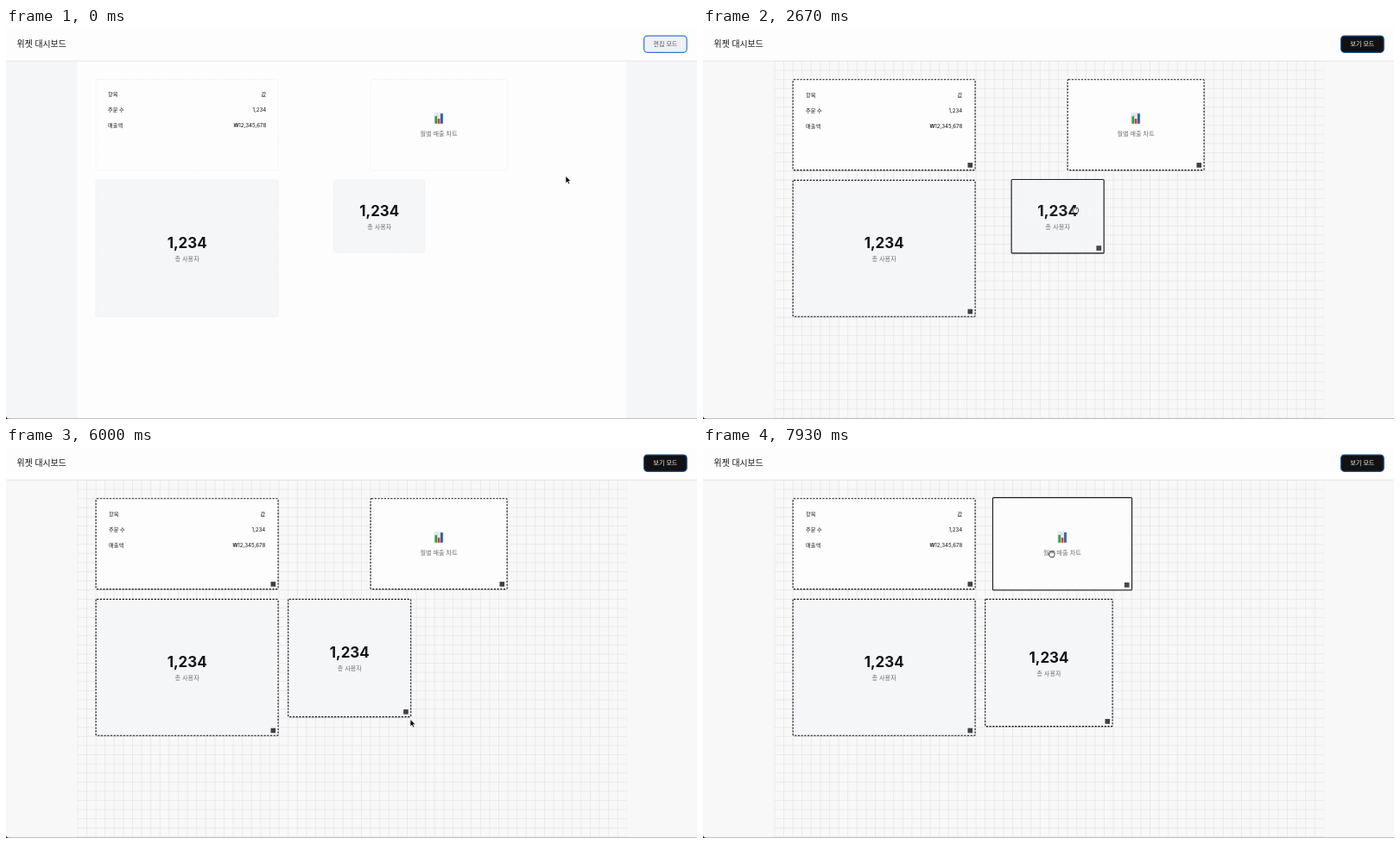
These frames come from a looping animation (800x453 px, 8000 ms). An HTML page:

```html
<!DOCTYPE html>
<html lang="ko">
<head>
<meta charset="utf-8">
<title>위젯 대시보드</title>
<style>
html, body { margin: 0; width: 100%; height: 100%; overflow: hidden; background: #f8f8f8; }
svg { display: block; width: 100%; height: 100%; }
text { font-family: Inter, 'Noto Sans CJK KR', 'Noto Sans CJK', sans-serif; fill: #141416; }
.title { font-size: 9.9px; font-weight: 500; }
.button { font-size: 7px; font-weight: 400; text-anchor: middle; }
.number { font-size: 16.9px; font-weight: 700; text-anchor: middle; }
.label { font-size: 7.1px; fill: #707076; text-anchor: middle; }
.cell { font-size: 6.2px; }
.right { text-anchor: end; }
.outline { fill: #fff; stroke: #111; stroke-width: .8; stroke-linejoin: round; }
</style>
</head>
<body>
<svg viewBox="0 0 800 453" preserveAspectRatio="none">
  <defs>
    <pattern id="grid" x="82.4" y="38" width="10.6" height="10.6" patternUnits="userSpaceOnUse">
      <path d="M.35 0V10.6M0 .35H10.6" fill="none" stroke="#e3e3ea" stroke-width=".7"/>
    </pattern>
  </defs>
  <rect id="page" width="800" height="453"/>
  <rect id="panel" x="82.4" y="38" width="636" height="415" fill="#fdfdfd"/>
  <rect id="gridArea" x="82.4" y="38" width="636" height="415" fill="url(#grid)"/>
  <rect width="800" height="38" fill="#fdfdfd"/>
  <path d="M0 38.2H800" stroke="#e6e6ea" stroke-width=".9"/>
  <text class="title" x="12.6" y="21.8">위젯 대시보드</text>
  <rect id="button" x="738.6" y="9.1" width="49.6" height="19.2" rx="4" stroke-width="1.2"/>
  <text id="buttonText" class="button" x="763.4" y="21.1"></text>
  <g id="cards"></g>
  <path d="M0 452.6H800" stroke="#a8a8a8" stroke-width=".8"/>
  <path d="M0 449Q0 453 4 453H0Z" fill="#111"/>
  <g id="cursor">
    <path id="arrow" d="M0 0V8.2L1.9 6.5L3.2 9.3L4.6 8.7L3.4 6H5.9Z"
          fill="#000" stroke="#fff" stroke-width=".6"/>
    <path id="hand" class="outline" d="M-1 0Q0-1 .8 0V3.3L4.5 4Q5.6 4.4 5.4 6L4.6 9H.2L-2.6 5.6Q-2.7 4.4-1 5.2Z"/>
    <g id="grab">
      <path class="outline" d="M-3-1.6Q-2.3-3.4-1-2.6Q.2-3.7 1.2-2.6Q2.6-3.2 3.1-1.5L3 1.4L1.9 3.6H-1.7L-3.5.8Q-3.8-.6-3-1.6Z"/>
      <path d="M-1-2.4V-.6M1.1-2.4V-.6M-2.7-1.2V.4" stroke="#111" stroke-width=".6"/>
    </g>
  </g>
</svg>
<script>
const LOOP = 8000, CELL = 10.6, EDIT = 1400;
const DRAG = [2400, 3950], RESIZE = [4950, 6400], CHART_DRAG = 7250;
const $ = id => document.getElementById(id);
const clamp = v => Math.max(0, Math.min(1, v));
const ease = v => (v = clamp(v), v * v * (3 - 2 * v));
const mix = (a, b, k) => a + (b - a) * k;
const set = (el, attrs) => { for (const name in attrs) el.setAttribute(name, attrs[name]); };
const rgb = (a, b, k) => `rgb(${a.map((v, i) => Math.round(mix(v, b[i], k)))})`;

// time, x, y of the pointer
const track = [
  [0, 648, 171.5], [1200, 754, 19], [1520, 754, 19], [2300, 453, 211],
  [2400, 453, 211], [2670, 431.5, 211], [3350, 400, 210.5], [4130, 400, 210.5],
  [4800, 431, 263], [4950, 431, 263], [5470, 451, 285], [6300, 473, 324],
  [6670, 474, 323], [6730, 485, 273], [7130, 489, 124], [7250, 489, 124],
  [7930, 404, 124], [8000, 400, 124]
];

// Monotone cubic interpolation: flat at rests, smooth through points passed.
function pointerAt(t) {
  let i = 0;
  while (i < track.length - 2 && t >= track[i + 1][0]) i++;
  const slope = (n, axis) => {
    const a = track[n], b = track[n + 1];
    return a && b ? (b[axis] - a[axis]) / (b[0] - a[0]) : 0;
  };
  const tangent = (n, axis) => {
    const a = slope(n - 1, axis), b = slope(n, axis);
    return a * b > 0 ? 2 * a * b / (a + b) : 0;
  };
  const [a, b] = [track[i], track[i + 1]], span = b[0] - a[0], u = clamp((t - a[0]) / span);
  return [1, 2].map(axis => mix(a[axis], b[axis], ease(u))
    + span * u * (1 - u) * (tangent(i, axis) * (1 - u) - tangent(i + 1, axis) * u));
}

const table = [['항목', '값'], ['주문 수', '1,234'], ['매출액', '₩12,345,678']]
  .map(([key, value], i) => {
    const y = 20.2 + i * 17.6, weight = i ? 400 : 500;
    return `<text class="cell" x="14.4" y="${y}" font-weight="${weight}">${key}</text>
      <text class="cell right" x="197.7" y="${y}" font-weight="${weight}">${value}</text>`;
  }).join('');
const counter = '<text class="number" y="-.2">1,234</text><text class="label" y="14.6">총 사용자</text>';
const chart = `<rect x="-5.6" y="-14.4" width="11.2" height="13" rx=".6" fill="#e6ebee"/>
  <path d="M-5.6-10.5H5.6M-5.6-6.5H5.6M-2-14.4V-1.4M2-14.4V-1.4" stroke="#c5cdd2" stroke-width=".4"/>
  <rect x="-4.6" y="-10" width="2.6" height="8.6" fill="#2c9d38"/>
  <rect x="-1.3" y="-7" width="2.6" height="5.6" fill="#d8372c"/>
  <rect x="2" y="-13" width="2.7" height="11.6" fill="#285e9e"/>
  <text class="label" y="12.9">월별 매출 차트</text>`;

function makeCard(col, row, cols, rows, content, tinted, centred = true) {
  const root = document.createElementNS('http://www.w3.org/2000/svg', 'g');
  root.innerHTML = `<rect class="shadow" fill="#5a5e68" rx="2"/><rect class="box" rx="2"/>
    <g class="content">${content}</g><rect class="handle" width="5.6" height="5.6" fill="#404044"/>`;
  $('cards').append(root);
  const part = name => root.querySelector('.' + name);
  return {
    root, tinted, centred, x: 82.4 + col * CELL, y: 38 + row * CELL, w: cols * CELL, h: rows * CELL,
    shadow: part('shadow'), box: part('box'), content: part('content'), handle: part('handle')
  };
}
const cards = [
  makeCard(2, 2, 20, 10, table, false, false),
  makeCard(2, 13, 20, 15, counter, true),
  makeCard(28, 13, 10, 8, counter, true),
  makeCard(32, 2, 15, 10, chart, false)
];

function drawCard(card, { x = card.x, y = card.y, w = card.w, h = card.h, lift = 0 }, t, pointer) {
  const edit = t >= EDIT, k = edit ? ease((t - EDIT - 20) / 160) : 0;
  const hover = pointer[0] > x && pointer[0] < x + w && pointer[1] > y && pointer[1] < y + h;
  const solid = hover || lift > 0, inset = mix(.3, .53, k);
  const cx = x + w / 2, cy = y + h / 2, scale = 1 + .02 * lift;
  set(card.root, {
    transform: `translate(${cx} ${cy}) scale(${scale}) translate(${-w / 2} ${-h / 2})`,
    opacity: 1 - .05 * lift
  });
  set(card.shadow, { y: .7, width: w, height: h, opacity: edit ? .22 : 0 });
  set(card.box, {
    x: inset, y: inset, width: w - 2 * inset, height: h - 2 * inset, rx: mix(2.5, 1, k),
    fill: card.tinted ? '#f4f6f8' : '#fdfdfd',
    stroke: rgb([232, 232, 236], [17, 17, 19], k), 'stroke-width': mix(.6, 1.1, k),
    'stroke-dasharray': edit && !solid ? '2.1 1.6' : edit ? 'none' : '1.6 1'
  });
  set(card.content, { transform: card.centred ? `translate(${w / 2} ${h / 2})` : `translate(${k} ${k})` });
  if (!card.centred)
    card.content.querySelectorAll('.right').forEach(el => set(el, { x: 197.7 - 2 * k }));
  set(card.handle, { x: w - 8.1 - k, y: h - 8.1 - k, visibility: edit ? 'visible' : 'hidden' });
  return hover;
}

function counterState(t, pointer) {
  const card = cards[2], between = ([from, to]) => t >= from && t < to;
  const lift = ease((t - DRAG[0]) / 150) * (1 - ease((t - DRAG[1]) / 150));
  const x = between(DRAG) ? card.x + pointer[0] - 453 : t < DRAG[0] ? card.x : card.x - 5 * CELL;
  if (between(RESIZE))
    return { x, w: card.w + pointer[0] - 431, h: card.h + pointer[1] - 263 };
  return t < RESIZE[0] ? { x, lift } : { x, w: 14 * CELL, h: 14 * CELL };
}

function chartState(t, pointer) {
  return t < CHART_DRAG ? {} : {
    x: cards[3].x + pointer[0] - 489,
    lift: ease((t - CHART_DRAG) / 150)
  };
}

function render(t) {
  const edit = t >= EDIT, pointer = pointerAt(t);
  const dark = edit ? ease((t - EDIT) / 200) : 0;
  set($('page'), { fill: edit ? '#f8f8f8' : '#f5f6f7' });
  set($('panel'), { visibility: edit ? 'hidden' : 'visible' });
  set($('gridArea'), { visibility: edit ? 'visible' : 'hidden' });
  set($('button'), {
    fill: rgb([238, 241, 245], [17, 17, 17], dark),
    stroke: rgb([52, 120, 208], [30, 82, 150], dark)
  });
  $('buttonText').textContent = edit ? '보기 모드' : '편집 모드';
  $('buttonText').style.fill = rgb(edit ? [60, 60, 64] : [84, 84, 90], [253, 253, 253], dark);

  const states = [{}, {}, counterState(t, pointer), chartState(t, pointer)];
  const hovers = cards.map((card, i) => drawCard(card, states[i], t, pointer));
  const resizing = t >= RESIZE[0] - 150 && t < 6670;
  const overButton = pointer[0] > 738 && pointer[1] > 9 && pointer[1] < 28;
  const kind = overButton ? 'hand' : edit && !resizing && hovers.some(Boolean) ? 'grab' : 'arrow';
  for (const id of ['arrow', 'hand', 'grab'])
    set($(id), { visibility: id === kind ? 'visible' : 'hidden' });
  set($('cursor'), { transform: `translate(${pointer})` });
}

const start = performance.now();
function tick() {
  render((performance.now() - start) % LOOP);
  requestAnimationFrame(tick);
}
tick();
</script>
</body>
</html>
```
